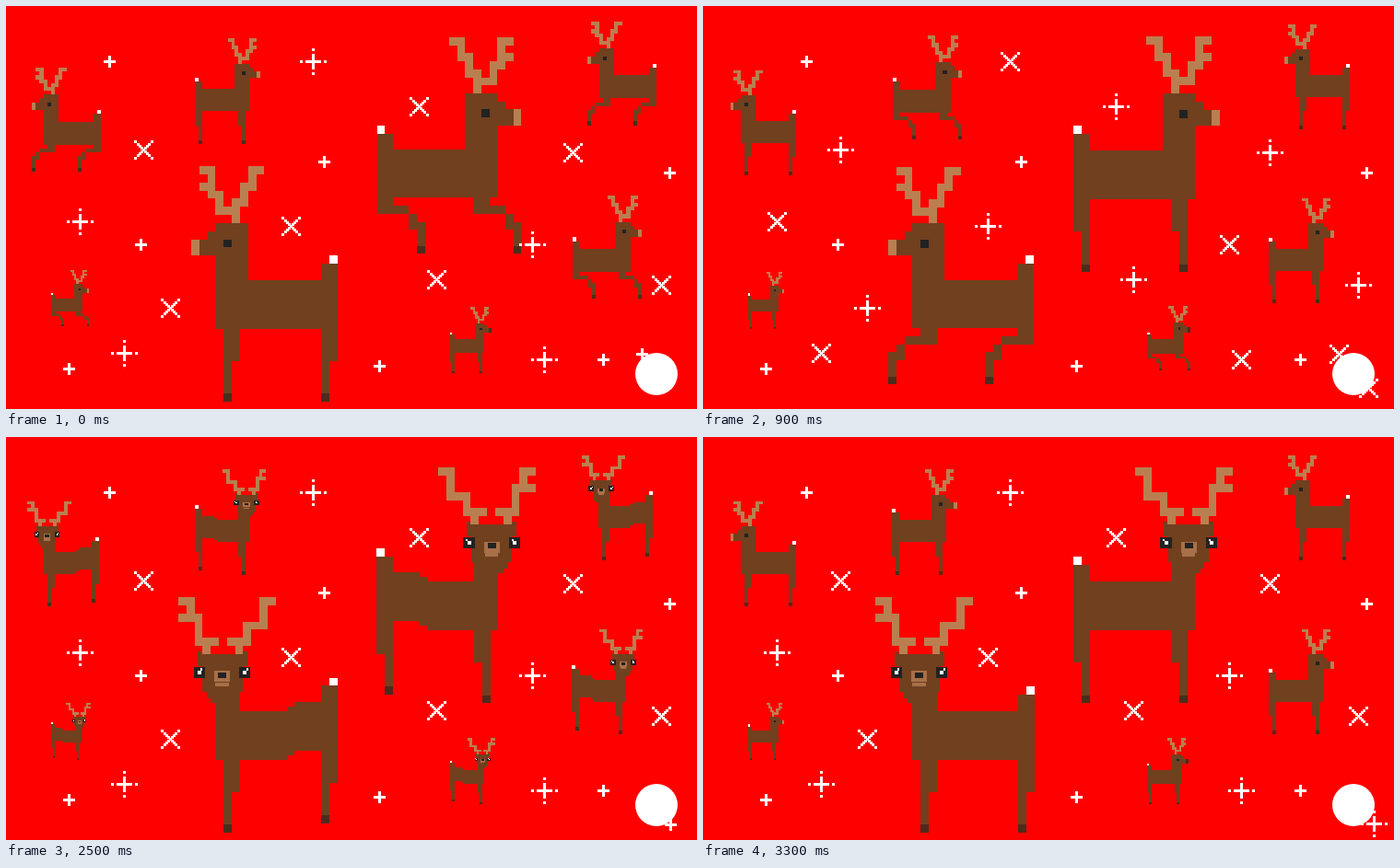
These frames come from a looping animation (750 by 438 pixels, 3500 ms). An HTML page with a canvas:

```html
<!DOCTYPE html>
<html lang="en">
<head>
<meta charset="utf-8">
<title>Dancing reindeer</title>
<style>
html, body { margin: 0; width: 100%; height: 100%; overflow: hidden; background: #f00; }
canvas { display: block; }
</style>
</head>
<body>
<canvas id="stage" width="750" height="438"></canvas>
<script>
const ctx = document.getElementById('stage').getContext('2d');
const BROWN = '#70401f', TAN = '#ba7f50', MUZZLE = '#a87048', HOOF = '#4c2c1c', DARK = '#222', WHITE = '#fff';
const LOOP = 3500;
const STEPS = [0, 300, 600, 900, 1200, 1500, 2500, 2600, 2700, 2800, 2900, 3000, 3100, 3200, 3300];

const SIDE_ANTLERS = ['XX....XX', '.X....X.', '.XX...XX', '..X..XX.', '..XX.X..', '...XXX..', '...X....'];
const FRONT_ANTLERS = [
  'XX........XX',
  '.X........X.',
  'XXX.......X.',
  '..X.....XXX.',
  '..X.....X...',
  '..XXX.XXX...',
  '...X...X....'
];

// stand and leap: left, top, size of one block
const DEER = [
  { stand: [29.5, 69.5, 3.95], leap: [28, 67, 4.18], first: true },
  { stand: [205, 35, 3.95], leap: [206, 32, 4.18], right: true },
  { stand: [201, 174.2, 8.82], leap: [201, 175, 8.75], big: true },
  { stand: [402, 33.3, 8.83], leap: [402.5, 34, 8.72], right: true, big: true, first: true },
  { stand: [631, 19.7, 3.94], leap: [631, 17, 4.17], first: true },
  { stand: [614, 208.5, 3.95], leap: [615, 205.5, 4.17], right: true, first: true },
  { stand: [49, 288.5, 2.17], leap: [49, 286.5, 2.28], right: true, first: true },
  { stand: [482, 327.3, 2.48], leap: [482, 326, 2.6], right: true, nose: HOOF }
];

const SMALL = [[112, 60], [345, 169], [720, 181], [146, 259], [68, 394], [405, 391], [648, 384]];
const PLUS_FIRST = [[333, 60], [80, 234], [128, 377], [571, 259], [584, 384]];
const CROSS_FIRST = [[149, 156], [448, 109], [615, 159], [309, 239], [178, 328], [467, 297], [711, 303]];

// Twinkles around the badge, one list per step
const TWINKLES = [
  [[small, 690, 378]], [[cross, 690, 378]], [[plus, 690, 378]],
  [[cross, 690, 378], [cross, 722, 415]], [[small, 690, 378], [plus, 722, 415]], [[plus, 690, 378]],
  [[small, 721, 421]], [[cross, 721, 421]], [[plus, 721, 421]],
  [[small, 728, 385]], [[cross, 728, 385]], [[plus, 728, 385]],
  [[small, 728, 420]], [[cross, 728, 420]], [[plus, 728, 420]]
];

function dot(x, y, w = 3, h = 3) {
  ctx.fillRect(x - (w >> 1), y - (h >> 1), w, h);
}
function small(x, y) {
  dot(x, y, 13, 3);
  dot(x, y, 3, 13);
}
function plus(x, y) {
  dot(x, y, 17, 3);
  dot(x, y, 3, 17);
  for (const d of [-13, 13]) {
    dot(x + d, y);
    dot(x, y + d);
  }
}
function cross(x, y) {
  for (const d of [-9, -6, -4, -2, 0, 2, 4, 6, 9]) {
    dot(x + d, y + d);
    dot(x + d, y - d);
  }
}

// Block painter in deer units; deer are described facing left
function painter([left, top, u], flip) {
  return (color, x, y, w, h) => {
    const x0 = Math.round(left + (flip ? 18 - x - w : x) * u);
    const x1 = Math.round(left + (flip ? 18 - x : x + w) * u);
    const y0 = Math.round(top + y * u), y1 = Math.round(top + (y + h) * u);
    ctx.fillStyle = color;
    ctx.fillRect(x0, y0, x1 - x0, y1 - y0);
  };
}

function pattern(box, rows, x, dir) {
  rows.forEach((row, y) => [...row].forEach((c, i) => {
    if (c === 'X') box(TAN, dir > 0 ? x + i : x - i - 1, y, 1, 1);
  }));
}

function sideHead(box, nose = TAN) {
  pattern(box, SIDE_ANTLERS, 9, -1);
  box(BROWN, 3, 7, 4, 8);
  box(BROWN, 2, 8, 1, 1);
  box(BROWN, 1, 9, 2, 2);
  box(nose, 0, 9, 1, 2);
  box(DARK, 4, 9, 1, 1);
}

function frontHead(box) {
  const m = 3.8;
  pattern(box, FRONT_ANTLERS, -1.6, 1);
  box(BROWN, m - 3, 6.7, .5, .4);
  box(BROWN, m + 2.6, 6.7, .5, .4);
  box(BROWN, m - 3, 7, 6.1, 1.5);
  box(BROWN, m - 2.4, 8.4, 4.9, 3.2);
  box(BROWN, m - 1.9, 11.5, 4.1, .9);
  box(BROWN, m - 1.4, 12.4, 3.6, .6);
  box(BROWN, m - .8, 13, 3, 1);
  for (const x of [m - 3.5, m + 2.1]) {
    box(DARK, x, 8.55, 1.4, 1.4);
    box(WHITE, x + .45, 9, .45, .45);
    box(WHITE, x + .85, 8.75, .25, .3);
  }
  box(MUZZLE, m - 1, 9.1, 2, 1.35);
  box(DARK, m - .55, 9.3, 1.1, .6);
  box(MUZZLE, m - .8, 10.55, 1.6, .4);
}

function straightLeg(box, x, top, lift) {
  box(BROWN, x, top, 2, 24 + lift - top);
  box(BROWN, x, 24 + lift, 1, 4);
  box(HOOF, x, 28 + lift, 1, 1);
}

function bentLeg(box, x) {
  box(BROWN, x + 4, 20, 2, 1);
  box(BROWN, x + 2, 21, 4, 1);
  box(BROWN, x + 1, 22, 1, 1);
  box(BROWN, x, 23, 2, 1);
  box(BROWN, x, 24, 1, 2);
  box(HOOF, x, 26, 1, 1);
}

function body(box, shift) {
  box(BROWN, 3, 14, 8.8, 6);
  box(BROWN, 11.8, 14 + shift / 2, .9, 6);
  box(BROWN, 12.7, 14 + shift, 5.3, 6);
  box(BROWN, 16, 12 + shift, 2, 2);
  box(WHITE, 17, 11 + shift, 1, 1);
}

function drawDeer(deer, step) {
  const running = step < 5;
  const wiggling = step > 5 && step < 14;
  const leaping = running && (step % 2 === 0) === !!deer.first;
  const shift = wiggling ? (step % 2 ? 1.05 : -1.1) : 0;
  const box = painter(leaping ? deer.leap : deer.stand, deer.right);
  body(box, shift);
  if (leaping) {
    bentLeg(box, 0);
    bentLeg(box, 12);
  } else {
    straightLeg(box, 4, 20, 0);
    straightLeg(box, 16, 20 + shift, Math.min(shift, 0));
  }
  if (wiggling || (deer.big && !running)) frontHead(box);
  else sideHead(box, deer.nose);
}

function draw(time) {
  const step = STEPS.findLastIndex(t => t <= time);
  ctx.fillStyle = '#f00';
  ctx.fillRect(0, 0, 750, 438);
  DEER.forEach(deer => drawDeer(deer, step));
  ctx.fillStyle = WHITE;
  const [a, b] = step % 2 ? [cross, plus] : [plus, cross];
  SMALL.forEach(p => small(...p));
  PLUS_FIRST.forEach(p => a(...p));
  CROSS_FIRST.forEach(p => b(...p));
  TWINKLES[step].forEach(([star, x, y]) => star(x, y));
  ctx.beginPath();
  ctx.arc(706, 400, 23, 0, 7);
  ctx.fill();
}

const start = performance.now();
function tick() {
  draw((performance.now() - start) % LOOP);
  requestAnimationFrame(tick);
}
tick();
</script>
</body>
</html>
```
